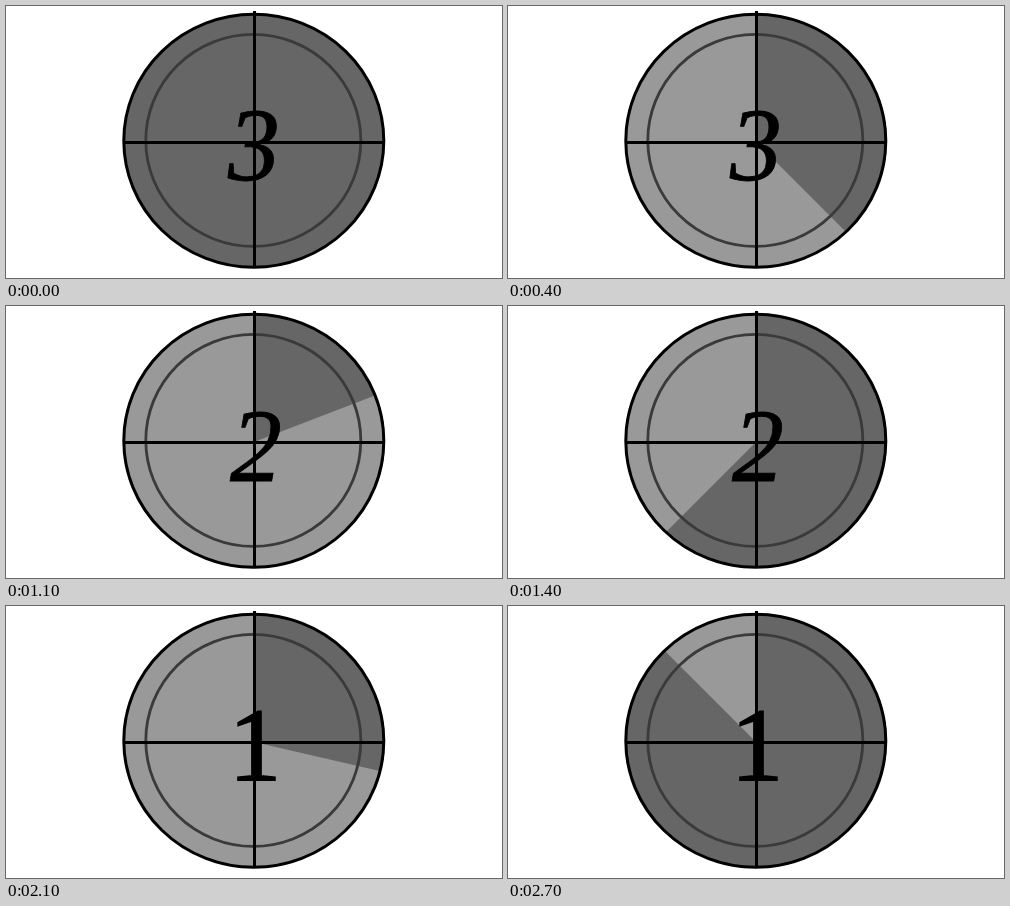
Write an HTML page that moves like this. It is 496x272 px and loops after 2800 ms.

```html
<!DOCTYPE html>
<html lang="en">
<head>
<meta charset="utf-8">
<title>Countdown</title>
<style>
  html, body { margin: 0; width: 100%; height: 100%; overflow: hidden; background: #fff; }
  svg { display: block; width: 496px; height: 272px; }
  text { font-family: "Liberation Serif", "Times New Roman", serif; font-size: 104px; text-anchor: middle; }
  .italic { font-style: italic; stroke: #000; stroke-width: 0.8; }
  .upright { stroke: #000; stroke-width: 2; }
</style>
</head>
<body>
<svg viewBox="0 0 496 272">
  <defs>
    <clipPath id="disc"><ellipse cx="247.8" cy="134.8" rx="130" ry="126.5"/></clipPath>
  </defs>
  <ellipse cx="247.8" cy="134.8" rx="130" ry="126.5" fill="#999"/>
  <path id="sweep" fill="#666" clip-path="url(#disc)"/>
  <ellipse cx="247.3" cy="134.4" rx="107.5" ry="106" fill="none" stroke="#3a3a3a" stroke-width="2.8"/>
  <ellipse cx="247.8" cy="134.8" rx="130" ry="126.5" fill="none" stroke="#000" stroke-width="3"/>
  <g id="digits">
    <text class="italic" x="248" y="174">3</text>
    <text class="italic" x="250" y="174.5">2</text>
    <text class="upright" x="249" y="174">1</text>
  </g>
  <path d="M117 136.5H379M248.5 5V262" stroke="#000" stroke-width="3"/>
</svg>
<script>
  const STEP = 100;
  const CENTER = { x: 248, y: 136 };
  const REACH = 200;

  // Swept degrees per step, one row for each digit.
  const TURNS = [
    [360, 30, 62, 103, 135, 180, 225, 270, 298],
    [360, 35, 69, 103, 162, 225, 250, 274, 298],
    [360, 35, 69, 103, 120, 135, 162, 225, 270, 315]
  ];
  const steps = TURNS.flatMap((row, digit) => row.map(angle => ({ digit, angle })));

  const sweep = document.getElementById('sweep');
  const digits = [...document.getElementById('digits').children];

  function sector(angle) {
    const { x, y } = CENTER;
    if (angle >= 360) return 'M0 0H496V272H0Z';
    const a = angle * Math.PI / 180;
    const endX = x + REACH * Math.sin(a);
    const endY = y - REACH * Math.cos(a);
    return `M${x} ${y}V${y - REACH}A${REACH} ${REACH} 0 ${angle > 180 ? 1 : 0} 1 ${endX} ${endY}Z`;
  }

  function draw(time) {
    const { digit, angle } = steps[Math.floor(time / STEP) % steps.length];
    sweep.setAttribute('d', sector(angle));
    digits.forEach((el, i) => el.setAttribute('visibility', i === digit ? 'visible' : 'hidden'));
  }

  const start = performance.now();
  function tick() {
    draw(performance.now() - start);
    requestAnimationFrame(tick);
  }
  tick();
</script>
</body>
</html>
```
